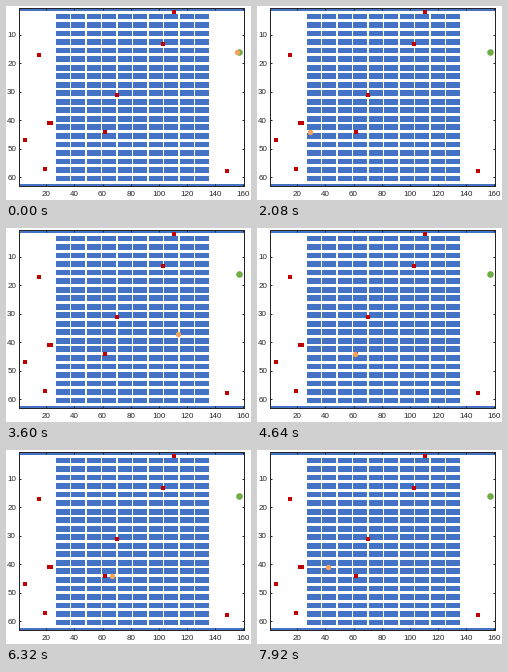
Write a matplotlib script that moves like this. It is 245 px wide and 194 px high and loops after 8 s.

```python
from collections import deque
import numpy as np
import matplotlib.pyplot as plt
from matplotlib.animation import FuncAnimation
from matplotlib.colors import to_rgb

W, H, DPI = 245, 194, 100
PX = 72 / DPI                      # points per pixel
COLS, ROWS = 161, 63
FRAMES, INTERVAL = 100, 80
CELLS_PER_FRAME = 10
INK = "#262626"
BLUE, RED, GREEN, ORANGE = "#4472C4", "#C00000", "#70AD47", "#F4A35C"

DEPOT, DOCK = (157, 16), (156, 16)
ITEMS = dict(A=(111, 2), B=(103, 13), C=(70, 31), D=(62, 44), E=(5, 47),
             F=(19, 57), G=(149, 58), H=(15, 17), I=(22, 41), J=(23, 41))
VISITS = "ABCDEFDGABCDEFHIDCBABCDI"
WAITS = {DOCK: 1, ITEMS["F"]: 2, ITEMS["H"]: 2}
EAST, NORTH, SOUTH, WEST = (1, 0), (0, -1), (0, 1), (-1, 0)


def is_rack(x, y):
    return (x > 26) & (x < 136) & ((x - 26) % 11 != 0) & (y % 3 != 2)


def is_wall(x, y):
    return (y <= 1) | (y >= ROWS)


def neighbours(cell, directions):
    for dx, dy in directions:
        x, y = cell[0] + dx, cell[1] + dy
        if 1 <= x <= COLS and not is_rack(x, y) and not is_wall(x, y):
            yield x, y


def distances_to(goal):
    """Breadth-first step counts from every free cell to the goal."""
    steps, queue = {goal: 0}, deque([goal])
    while queue:
        cell = queue.popleft()
        for near in neighbours(cell, (EAST, NORTH, SOUTH, WEST)):
            if near not in steps:
                steps[near] = steps[cell] + 1
                queue.append(near)
    return steps


def shortest_path(start, goal):
    """Traced west to east, so both ways use the same aisles: climb first,
    otherwise take the longer axis first."""
    west, east = sorted((start, goal))
    steep = abs(east[1] - west[1]) > abs(east[0] - west[0])
    order = (NORTH, SOUTH, EAST, WEST) if steep else (NORTH, EAST, SOUTH, WEST)
    steps, path = distances_to(east), [west]
    while path[-1] != east:
        here = path[-1]
        path.append(next(c for c in neighbours(here, order)
                         if steps[c] < steps[here]))
    return path if start == west else path[::-1]


def build_route():
    stops = [DOCK] + [ITEMS[name] for name in VISITS]
    route = [DOCK]
    for start, goal in zip(stops, stops[1:]):
        route += [start] * WAITS.get(start, 0)
        route += shortest_path(start, goal)[1:]
    return route[::CELLS_PER_FRAME]


def floor_plan():
    x, y = np.meshgrid(np.arange(1, COLS + 1), np.arange(1, ROWS + 1))
    image = np.ones((ROWS, COLS, 3))
    image[is_rack(x, y) | is_wall(x, y)] = to_rgb(BLUE)
    return image


plt.rcParams["font.family"] = "Liberation Sans"
fig = plt.figure(figsize=(W / DPI, H / DPI), dpi=DPI, facecolor="white")
ax = fig.add_axes([13 / W, 14 / H, 225 / W, 178 / H])
ax.imshow(floor_plan(), extent=(0.5, COLS + 0.5, ROWS + 0.5, 0.5),
          aspect="auto", interpolation="nearest")
# The frame cuts one pixel off the right and bottom of the plan
ax.set_xlim(0.5, 0.5 + COLS * 225 / 226)
ax.set_ylim(0.5 + ROWS * 178 / 179, 0.5)
ax.set_xticks(range(20, 161, 20))
ax.set_yticks(range(10, 61, 10))
ax.tick_params(direction="in", top=True, right=True, length=2.5 * PX,
               width=PX, pad=3 * PX, color=INK, labelcolor=INK,
               labelsize=8 * PX)
ax.tick_params(axis="x", pad=4.5 * PX)
for spine in ax.spines.values():
    spine.set(linewidth=PX, color=INK)


def markers(points, shape, color, size, z):
    x, y = zip(*points)
    return ax.plot(x, y, shape, color=color, ms=size * PX, mew=0,
                   zorder=z, clip_on=False, snap=False)[0]


markers(ITEMS.values(), "s", RED, 4.8, 3)
markers([DEPOT], "o", GREEN, 6.6, 4)
picker = markers([DOCK], "o", ORANGE, 5.4, 5)
ROUTE = build_route()


def update(i):
    x, y = ROUTE[i]
    picker.set_data([x], [y])
    return [picker]


anim = FuncAnimation(fig, update, frames=FRAMES, interval=INTERVAL,
                     repeat=True, repeat_delay=0)
plt.show()
```
